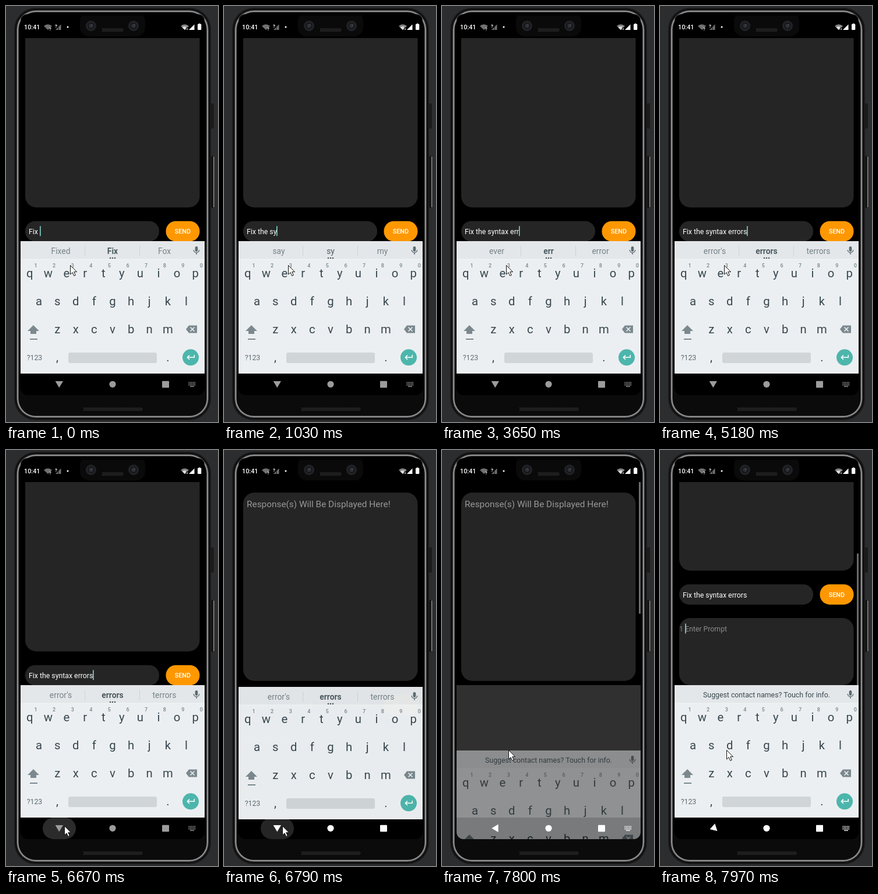
Recreate the animation shown at these times as an HTML page with a canvas. Size 364 by 713 pixels, loop 8 s.

```html
<!DOCTYPE html>
<html lang="en">
<head>
<meta charset="utf-8">
<title>Phone typing</title>
<style>
html, body { margin: 0; width: 100%; height: 100%; overflow: hidden; background: #2c2d2f; }
canvas { display: block; width: 364px; height: 713px; }
</style>
</head>
<body>
<canvas id="stage"></canvas>
<script>
const W = 364, H = 713, LOOP = 8000;
const VIEW_TOP = 55, KB_TOP = 403, NAV_TOP = 630, SCREEN_END = 667;
const HIDE_AT = 6770, SHOW_AT = 7740;
const dpr = window.devicePixelRatio || 1;

function makeContext(canvas) {
  canvas.width = W * dpr;
  canvas.height = H * dpr;
  const context = canvas.getContext('2d');
  context.scale(dpr, dpr);
  return context;
}
const stage = makeContext(document.getElementById('stage'));
const kbCanvas = document.createElement('canvas');
const kbContext = makeContext(kbCanvas);
let g = stage;

// Typed text: [time, text]
const typed = [
  [0, 'Fix '], [120, 'Fix t'], [300, 'Fix th'], [390, 'Fix the'], [760, 'Fix the '],
  [1030, 'Fix the sy'], [1210, 'Fix the syn'], [1450, 'Fix the synt'],
  [1870, 'Fix the synta'], [2170, 'Fix the syntax'], [2660, 'Fix the syntax '],
  [2870, 'Fix the syntax e'], [3110, 'Fix the syntax er'], [3470, 'Fix the syntax err'],
  [3820, 'Fix the syntax erro'], [4060, 'Fix the syntax error'],
  [4420, 'Fix the syntax error '], [4570, 'Fix the syntax error'], [5030, 'Fix the syntax errors']
];

// Suggestions: [time, 'left|middle|right', bold middle, more dots]
const hints = [
  [0, 'Fixed|Fix|Fox', 1, 1], [210, 'to|t|the', 0, 1], [480, 'they|the|these', 1, 1],
  [850, 'same|first|issue', 0, 0], [1030, 'say|sy|my', 0, 1], [1300, 'sun|syn|system', 0, 1],
  [1510, 'syn|synt|synthesis', 0, 1], [1690, 'synthesis|synt|synthetic', 0, 1],
  [2050, 'syntax|synta|syntactic', 0, 1], [2320, "syntaxes|syntax|syntax's", 1, 1],
  [2720, 'error|of|and', 0, 0], [2930, 'w|e|r', 0, 1], [3110, 'or|er|err', 0, 1],
  [3260, 'ever|er|over', 0, 1], [3650, 'ever|err|error', 1, 1], [3850, 'euro|erro|error', 0, 1],
  [4240, 'error|error|errors', 1, 1], [4480, 'in|and|of', 0, 0],
  [4570, "error's|error|errors", 1, 1], [5180, "error's|errors|terrors", 1, 1],
  [7300, 'Suggest contact names? Touch for info.', 0, 0]
];

// Pointer moves: [start, end, x0, y0, x1, y1]
const moves = [
  [5920, 6370, 111, 444, 101, 644],
  [6850, 7110, 101, 644, 115, 488],
  [7140, 7230, 115, 488, 115, 514]
];

const clamp = v => Math.max(0, Math.min(1, v));
const progress = (t, a, b) => clamp((t - a) / (b - a));
const easeInOut = p => p * p * (3 - 2 * p);
const easeOut = p => 1 - (1 - p) * (1 - p);
const current = (list, t) => list.filter(row => row[0] <= t).pop();

function rect(x, y, w, h, color) {
  g.fillStyle = color;
  g.fillRect(x, y, w, h);
}
function roundPath(x, y, w, h, r) {
  g.beginPath();
  g.moveTo(x + r, y);
  g.arcTo(x + w, y, x + w, y + h, r);
  g.arcTo(x + w, y + h, x, y + h, r);
  g.arcTo(x, y + h, x, y, r);
  g.arcTo(x, y, x + w, y, r);
  g.closePath();
}
function pill(x, y, w, h, r, color) {
  roundPath(x, y, w, h, r);
  g.fillStyle = color;
  g.fill();
}
function disc(x, y, r, color) {
  g.beginPath();
  g.arc(x, y, r, 0, Math.PI * 2);
  g.fillStyle = color;
  g.fill();
}
function tracePath(points) {
  g.beginPath();
  points.forEach(([x, y], i) => i ? g.lineTo(x, y) : g.moveTo(x, y));
}
function poly(points, color) {
  tracePath(points);
  g.closePath();
  g.fillStyle = color;
  g.fill();
}
function line(points, color, width) {
  tracePath(points);
  g.strokeStyle = color;
  g.lineWidth = width;
  g.stroke();
}
function text(str, x, y, size, color, align = 'left', weight = 400) {
  g.font = `${weight} ${size}px Roboto, sans-serif`;
  g.textAlign = align;
  g.fillStyle = color;
  g.fillText(str, x, y);
}

function grille(x, y, w) {
  for (let row = 0; row < 3; row++)
    for (let i = row % 2 * 1.3; i < w; i += 2.6) rect(x + i, y + row * 2, 1.4, 1.2, '#484848');
}

// Nested shells, each inset evenly from the edge of the phone
function shell(inset, color) {
  pill(14 + inset, 3 + inset, 338 - inset * 2, 707 - inset * 2, 37 - inset, color);
}

function drawBody() {
  rect(0, 0, W, H, '#2c2d2f');
  pill(352, 167, 5, 43, 1, '#1b1b1c');
  pill(352, 257, 6, 89, 1.5, '#161616');
  rect(356, 258, 1.5, 87, '#909090');
  shell(0, '#1a1a1b');
  shell(2, '#0c0c0c');
  shell(4, '#4a4a4a');
  shell(5.5, '#a6a6a6');
  shell(7, '#3a3a3a');
  shell(8, '#030303');
  pill(23, 640, 320, 62, 28, '#0b0b0b');
  grille(133, 688.5, 101);
}

function fan(x, y, r, color) {
  g.beginPath();
  g.moveTo(x, y);
  g.arc(x, y, r, -Math.PI * 0.76, -Math.PI * 0.24);
  g.closePath();
  g.fillStyle = color;
  g.fill();
}

function drawStatus() {
  text('10:41', 31, 40, 10.8, '#fff', 'left', 500);
  fan(72, 41, 9.5, '#707070');
  text('?', 74, 42, 7.5, '#eee', 'left', 700);
  poly([[85, 41], [94.5, 41], [94.5, 31.5]], '#707070');
  text('?', 84, 37, 8, '#fff', 'left', 700);
  line([[90, 35], [90, 41]], '#111', 1);
  disc(106, 36, 1.5, '#fff');
  fan(307, 41, 9.5, '#858585');
  fan(307, 41, 6, '#ddd');
  rect(309, 37, 4, 4, '#000');
  disc(311, 39.5, 1.1, '#fff');
  poly([[314, 41], [323.5, 41], [323.5, 31.5]], '#fff');
  pill(329, 31, 6.3, 10, 1, '#fff');
  rect(330.7, 30, 3, 2, '#fff');
}

function drawNotch() {
  pill(127, 11, 112, 41, 15, '#0a0a0a');
  rect(127, 11, 112, 6, '#030303');
  for (const x of [146, 219]) {
    disc(x, 34, 9, '#222326');
    disc(x, 34, 6, '#17181b');
    disc(x, 34, 3.4, '#2d3036');
    disc(x + 1.5, 32.5, 1, '#4c5057');
  }
  grille(165, 38.5, 36);
}

function caret(x, y) {
  rect(x, y, 1.7, 17, '#80cbc4');
}

function drawApp(t, scroll, bottom) {
  g.save();
  g.beginPath();
  g.rect(25, VIEW_TOP, 316, bottom - VIEW_TOP);
  g.clip();
  g.translate(0, -scroll);
  pill(33, 73, 299.5, 322.7, 19, '#252525');
  text('Response(s) Will Be Displayed Here!', 39, 98, 15.38, '#989898');
  pill(33, 419.2, 230, 34.7, 17, '#252525');
  const str = current(typed, t)[1];
  text(str, 39, 441.5, 12.3, '#fff');
  const blinkOff = (t >= 5710 && t < 6210) || t >= 7230;
  if (!blinkOff) caret(Math.round(39 + g.measureText(str).width - 0.3), 427.7);
  pill(274.5, 419.2, 58, 34.7, 17, '#ff9800');
  text('SEND', 303.3, 440.5, 10.77, '#fff', 'center', 500);
  pill(33, 477, 299.5, 115, 19, '#252525');
  text('1', 33, 499.7, 12.3, '#808080');
  text('Enter Prompt', 43, 499.7, 12.3, '#8c8c8c');
  if (t >= 7450) caret(43, 486.5);
  g.restore();
}

function drawScrollbar(scroll) {
  const view = KB_TOP - VIEW_TOP, content = view + 189;
  rect(338, VIEW_TOP + scroll * view / content, 3, view * view / content, '#6b6b6b');
}

function drawMic(color) {
  pill(324.7, 412, 4.6, 9, 2.3, color);
  g.beginPath();
  g.arc(327, 418, 4.8, 0, Math.PI);
  g.strokeStyle = color;
  g.lineWidth = 1.3;
  g.stroke();
  rect(326.3, 422.5, 1.4, 3.5, color);
}

function drawSuggestions(t) {
  const [, words, bold, dots] = current(hints, t);
  const [left, middle, right] = words.split('|');
  rect(25, KB_TOP, 316, 31, '#e4e7e9');
  rect(25, 433.5, 316, 1, '#f3f5f6');
  if (!middle) {
    text(left, 183, 424.2, 12.3, '#37474f', 'center');
  } else {
    text(left, 94, 424.6, 13.85, '#758288', 'center');
    text(middle, 183, 424.6, 13.85, '#4b5a61', 'center', bold ? 700 : 400);
    text(right, 272, 424.6, 13.85, '#758288', 'center');
    for (const x of [135, 229]) rect(x, 411, 1, 18, '#cdd3d6');
  }
  if (dots) for (const x of [179, 183, 187]) disc(x, 432, 1.3, '#4b5a61');
  drawMic('#5b6a71');
}

function drawKeyboard(t) {
  g.clearRect(0, 0, W, H);
  rect(25, KB_TOP, 316, NAV_TOP - KB_TOP, '#eceff1');
  drawSuggestions(t);
  const rows = [['qwertyuiop', 40.8, 464.7], ['asdfghjkl', 56.6, 513], ['zxcvbnm', 88.2, 561]];
  for (const [keys, x, y] of rows)
    [...keys].forEach((k, i) => text(k, x + i * 31.6, y, 20.3, '#37474f', 'center'));
  [...'1234567890'].forEach((n, i) => text(n, 51 + i * 31.6, 447.6, 9, '#78868c', 'center', 500));

  const grey = '#7b898f';
  poly([[47, 547], [57, 557], [52, 557], [52, 562], [42, 562], [42, 557], [37, 557]], grey);
  rect(41, 570, 13, 2, grey);
  poly([[309, 554], [314, 547.5], [328, 547.5], [328, 560.5], [314, 560.5]], grey);
  line([[316.5, 550.5], [323.5, 557.5]], '#eceff1', 1.6);
  line([[323.5, 550.5], [316.5, 557.5]], '#eceff1', 1.6);

  text('?123', 49, 606.8, 12.3, '#5c6b72', 'center');
  text(',', 88, 609, 20.3, '#37474f', 'center');
  text('.', 278, 609, 20.3, '#37474f', 'center');
  pill(107, 594, 152, 18, 3, '#d0d5d8');
  disc(317, 602.3, 14, '#4db6ac');
  line([[323.3, 598], [323.3, 602.3], [311.5, 602.3]], '#fff', 1.5);
  line([[315, 598.6], [311.3, 602.3], [315, 606]], '#fff', 1.5);
}

function drawNavIcons(t, kbShown) {
  const hidden = t >= HIDE_AT;
  const color = hidden ? '#fff' : '#9c9c9c';
  const turn = hidden
    ? 1 - progress(t, 6790, 6990) + progress(t, 7930, 8130)
    : 1;
  g.save();
  g.translate(91.3, 648.2);
  g.rotate(-turn * Math.PI / 2);
  poly([[-6, 0], [5.3, -6.7], [5.3, 6.7]], color);
  g.restore();
  disc(183, 648.3, 5.6, color);
  pill(268, 642.7, 12, 11.6, 1, color);
  if (!kbShown) return;
  for (let row = 0; row < 3; row++)
    for (let i = 0; i < 5; i++) rect(313.5 + i * 2.5, 644.5 + row * 2.3, 1.6, 1.4, color);
  rect(316, 651.5, 7, 1.3, color);
}

function drawRipple(t) {
  const grow = easeOut(progress(t, 6490, 6670));
  const fade = 1 - progress(t, 6760, 7000);
  if (!grow || !fade) return;
  g.save();
  g.globalAlpha = fade;
  const w = 57 * (0.5 + grow / 2);
  pill(91.5 - w / 2, 630, w, 37, Math.min(18.5, w / 2), grow < 1 ? '#232323' : '#2b2b2b');
  g.restore();
}

function drawPointer(t) {
  let x = 111, y = 444;
  for (const [a, b, x0, y0, x1, y1] of moves) {
    if (t < a) break;
    const p = easeInOut(progress(t, a, b));
    x = x0 + (x1 - x0) * p;
    y = y0 + (y1 - y0) * p;
  }
  g.save();
  g.translate(Math.round(x) - 0.5, Math.round(y) + 0.5);
  poly([[0, 0], [0, 15.5], [3.6, 12.2], [6.2, 18], [8.8, 16.8], [6.2, 11.2], [11, 11.2]], '#fff');
  g.strokeStyle = '#111';
  g.lineWidth = 1;
  g.stroke();
  g.restore();
}

function render(t) {
  // Keyboard presence: 1 is fully shown, 0 is gone
  const hide = progress(t, HIDE_AT, 6960);
  const kb = t < SHOW_AT ? 1 - hide * hide : easeOut(progress(t, SHOW_AT, 7940));
  const resized = t < HIDE_AT || t >= SHOW_AT;
  const scroll = t < HIDE_AT ? 50.5 : 189 * easeInOut(progress(t, 7800, 7960));

  g = kbContext;
  if (kb) drawKeyboard(t);

  g = stage;
  drawBody();
  g.save();
  roundPath(25, 14, 316, SCREEN_END - 14, 12);
  g.clip();
  rect(25, 14, 316, SCREEN_END - 14, '#000');
  drawApp(t, scroll, resized ? KB_TOP : NAV_TOP);
  if (t >= SHOW_AT) {
    rect(25, KB_TOP, 316, NAV_TOP - KB_TOP, '#303030');
    drawScrollbar(scroll);
  }
  drawRipple(t);
  if (kb) {
    g.globalAlpha = kb;
    g.drawImage(kbCanvas, 0, Math.ceil((1 - kb) * (NAV_TOP - KB_TOP)), W, H);
    g.globalAlpha = 1;
  }
  drawNavIcons(t, resized);
  g.restore();
  drawNotch();
  drawStatus();
  drawPointer(t);
}

let start;
function tick(now) {
  if (start === undefined) start = now;
  render((now - start) % LOOP);
  requestAnimationFrame(tick);
}
render(0);
requestAnimationFrame(tick);
</script>
</body>
</html>
```
